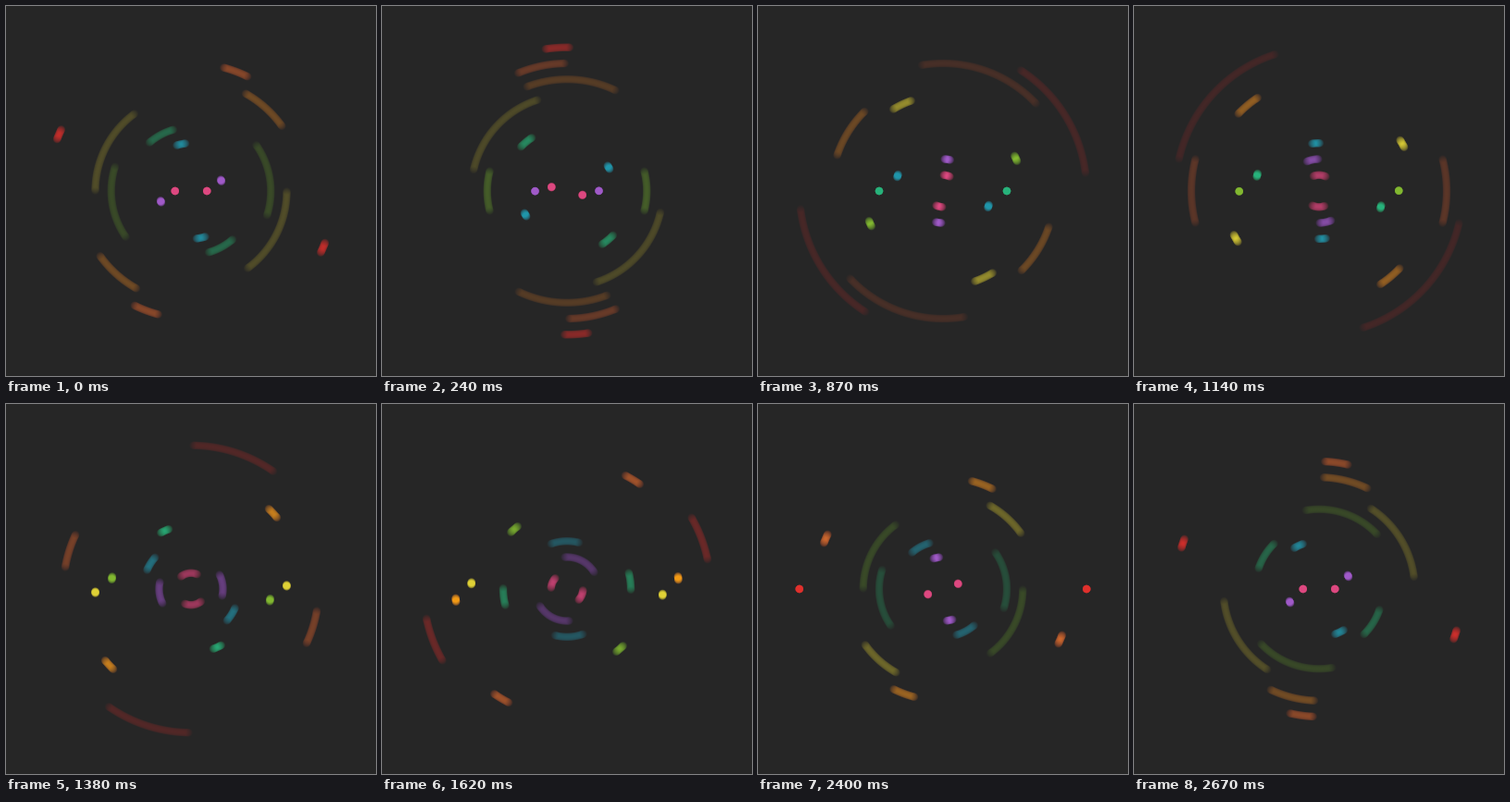
Recreate the animation shown at these times as an HTML page with a canvas. Size 400 by 400 pixels, loop 2.7 s.

```html
<!DOCTYPE html>
<html>
<head>
<meta charset="utf-8">
<title>Orbits</title>
<style>
  html, body { margin: 0; width: 100%; height: 100%; overflow: hidden; background: #262626; }
  canvas { display: block; width: 400px; height: 400px; }
</style>
</head>
<body>
<canvas width="400" height="400"></canvas>
<script>
const SIZE = 400, CENTER = 200, GAP = 17.25, DOT = 4.2;
const FRAMES = 90, FRAME_MS = 30, MOVE = 89, DELAY = 10, TURNS = 6;
const SHUTTER = 0.88, SAMPLES = 120;
const colors = ['#dd4880', '#a05ac8', '#1f95a9', '#27b27b', '#82b830',
                '#dfd136', '#f29a14', '#e0702f', '#e0302c'];

const ctx = document.querySelector('canvas').getContext('2d');
const image = ctx.createImageData(SIZE, SIZE);
const light = new Float32Array(SIZE * SIZE * 3);

// Blur is mixed in linear light, then encoded to sRGB through a lookup table.
const toLinear = v => v <= 0.04045 ? v / 12.92 : ((v + 0.055) / 1.055) ** 2.4;
const toSrgb = v => v <= 0.0031308 ? v * 12.92 : 1.055 * v ** (1 / 2.4) - 0.055;
const encode = Uint8Array.from({ length: 4097 }, (_, i) => Math.round(255 * toSrgb(i / 4096)));
const parse = hex => [1, 3, 5].map(i => toLinear(parseInt(hex.slice(i, i + 2), 16) / 255));
const ground = parse('#262626')[0];
const tints = colors.map(hex => parse(hex).map(v => v - ground));

// Cubic bezier easing (0.672, 0, 0.339, 1)
function ease(x) {
  if (x >= 1) return 1;
  let low = 0, high = 1, u = 0.5;
  for (let i = 0; i < 22; i++) {
    u = (low + high) / 2;
    const v = 1 - u;
    if (3 * 0.672 * u * v * v + 3 * 0.339 * u * u * v + u * u * u < x) low = u;
    else high = u;
  }
  return u * u * (3 - 2 * u);
}

function stamp(cx, cy, [r, g, b]) {
  const reach = DOT + 1;
  for (let y = Math.floor(cy - reach); y <= cy + reach; y++) {
    for (let x = Math.floor(cx - reach); x <= cx + reach; x++) {
      const edge = DOT + 0.5 - Math.hypot(x + 0.5 - cx, y + 0.5 - cy);
      if (edge <= 0) continue;
      const weight = Math.min(1, edge) / SAMPLES, k = (y * SIZE + x) * 3;
      light[k] += r * weight;
      light[k + 1] += g * weight;
      light[k + 2] += b * weight;
    }
  }
}

function draw(frame) {
  light.fill(ground);
  tints.forEach((tint, ring) => {
    const radius = GAP * (ring + 1);
    for (let i = 0; i < SAMPLES; i++) {
      const time = frame - DELAY * ring + SHUTTER * ((i + 0.5) / SAMPLES - 0.5);
      const phase = (time + 2 * FRAMES) % FRAMES;
      const angle = ease(phase / MOVE) * TURNS * 2 * Math.PI;
      const dx = radius * Math.cos(angle), dy = radius * Math.sin(angle);
      stamp(CENTER + dx, CENTER + dy, tint);
      stamp(CENTER - dx, CENTER - dy, tint);
    }
  });
  for (let p = 0, k = 0; k < light.length; p += 4) {
    for (let c = 0; c < 3; c++) {
      image.data[p + c] = encode[Math.max(0, Math.min(4096, Math.round(light[k++] * 4096)))];
    }
    image.data[p + 3] = 255;
  }
  ctx.putImageData(image, 0, 0);
}

let shown = -1;
function tick() {
  const frame = Math.floor(performance.now() / FRAME_MS) % FRAMES;
  if (frame !== shown) draw(shown = frame);
  requestAnimationFrame(tick);
}
tick();
</script>
</body>
</html>
```
